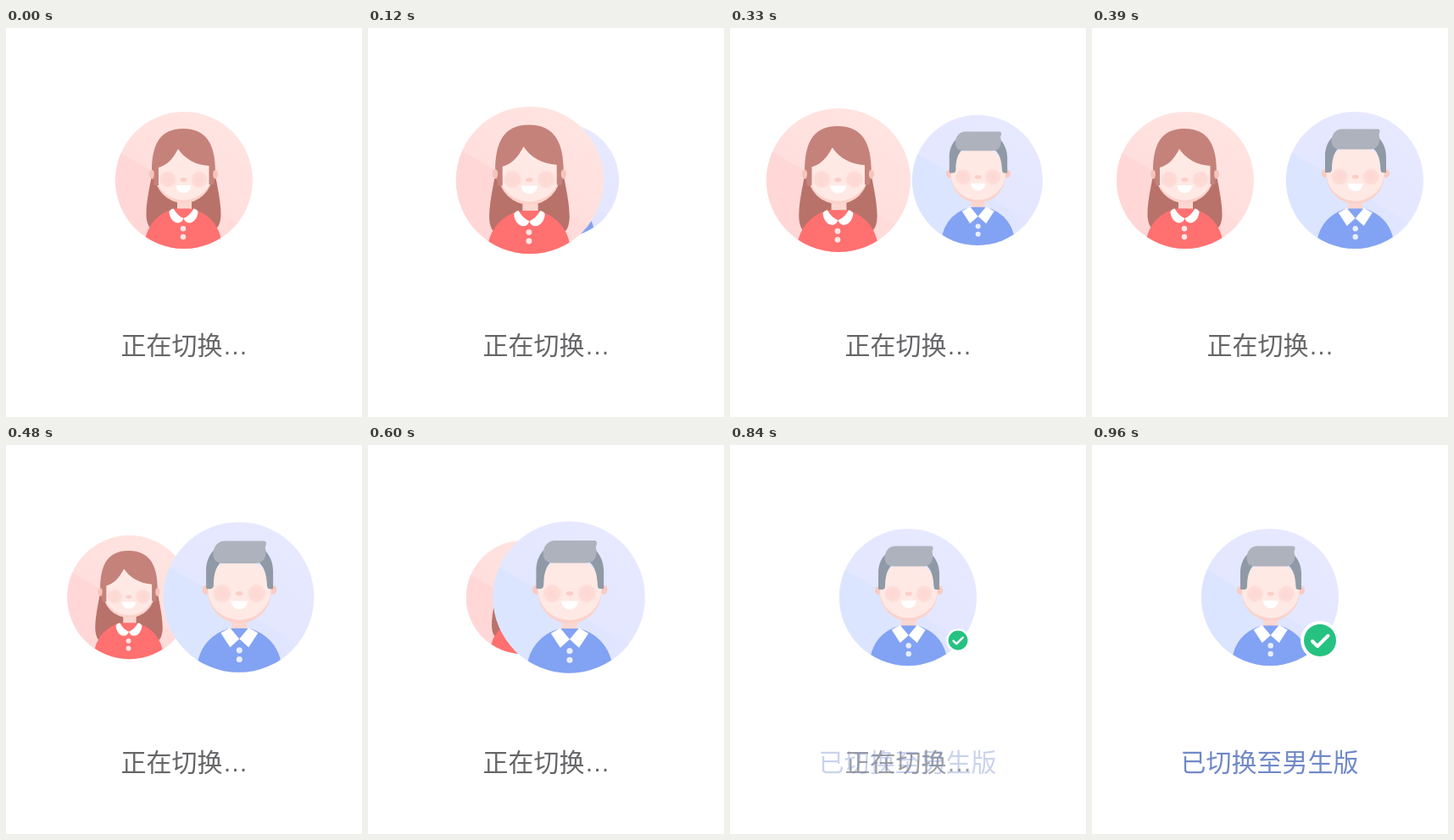
Animation of 420 by 460 pixels, one loop 990 ms. Source, as an HTML page with a canvas:

```html
<!DOCTYPE html>
<html lang="zh-CN">
<head>
<meta charset="utf-8">
<style>
  html, body { margin: 0; width: 100%; height: 100%; overflow: hidden; background: #fff; }
  canvas { display: block; }
</style>
</head>
<body>
<canvas id="stage" width="420" height="460"></canvas>
<script>
const ctx = document.getElementById('stage').getContext('2d');
const LOOP = 990, TURN = 390, SETTLE = 770, DONE = 960;
const RADIUS = 81, REACH = 100, CENTER = { x: 210, y: 180 };
const CJK = '30px "Noto Sans CJK SC", "Noto Sans CJK", sans-serif';
const LATIN = '30px "Liberation Sans", Arial, sans-serif';

const clamp01 = v => Math.min(1, Math.max(0, v));

function fillPath(color, d) {
  ctx.fillStyle = color;
  ctx.fill(new Path2D(d));
}

function ellipse(color, x, y, rx, ry = rx) {
  ctx.fillStyle = color;
  ctx.beginPath();
  ctx.ellipse(x, y, rx, ry, 0, 0, Math.PI * 2);
  ctx.fill();
}

function mirrored(draw, axis = 0) {
  for (const side of [1, -1]) {
    ctx.save();
    ctx.translate(axis, 0);
    ctx.scale(side, 1);
    draw();
    ctx.restore();
  }
}

function cheek(x, y) {
  const glow = ctx.createRadialGradient(x, y, 0, x, y, 11.5);
  glow.addColorStop(0, '#fdd8d3');
  glow.addColorStop(0.7, '#fddbd6');
  glow.addColorStop(1, 'rgba(255,230,225,0)');
  ellipse(glow, x, y, 11.5);
}

function backdrop(dark, mid, light) {
  const tone = ctx.createLinearGradient(-45, 70, 45, -70);
  tone.addColorStop(0, mid);
  tone.addColorStop(1, light);
  ctx.fillStyle = tone;
  ctx.fillRect(-82, -82, 164, 164);
  const shade = ctx.createLinearGradient(-40, 0, 50, 0);
  shade.addColorStop(0, dark);
  shade.addColorStop(1, mid);
  fillPath(shade, 'M-82 -37 L82 61 V82 H-82 Z');
}

function body(color, button, x) {
  fillPath('#fad7d0', 'M-8 20 H9 V37 H-8 Z');
  ctx.save();
  ctx.beginPath();
  ctx.rect(-60, 33.5, 120, 60);
  ctx.clip();
  ellipse(color, x, 78, 45.5);
  ctx.restore();
  ellipse(button, x, 57.3, 3.2);
  ellipse(button, x, 67, 3.2);
}

function face(x, chin, cheekY, noseY, mouthY) {
  const y = chin - 34;
  ellipse('#fbd2ca', x, y, 34);
  ellipse('#ffe9e5', x, y - 2.5, 34, 33);
  cheek(x - 18.5, cheekY);
  cheek(x + 18.5, cheekY);
  ellipse('#fbcec7', x, noseY, 4, 2.4);
  fillPath('#fff', `M${x - 9} ${mouthY} H${x + 9} C${x + 8} ${mouthY + 12} ${x - 8} ${mouthY + 12} ${x - 9} ${mouthY} Z`);
}

function girl() {
  backdrop('#ffd7d7', '#ffdbda', '#ffe4e1');
  mirrored(() => fillPath('#b8726a',
    'M0 -20 H35 C38 0 44 22 44 40 C44 50 41 58 35 58 H0 Z'), -0.5);
  body('#ff7070', '#ffe6e3', -1);
  mirrored(() => fillPath('#fff',
    'M12 33.5 C14 34 16 35 17 37 C17 44 12 51 6 50.5 C3 50 1 48 0 45 C5 43 9 39 12 33.5 Z'), -0.5);
  mirrored(() => ellipse('#f5c4bb', 36.5, -7, 4, 5.5), -0.5);
  face(-0.5, 27, -1, -0.5, 6);
  fillPath('#c5827a', 'M-38 -10 C-38 -40 -30 -61 -1 -61 C28 -61 37 -40 37 -10 ' +
    'L35 5 H29.5 V-17 C14 -18 1 -25 -7 -37 C-13 -25 -20 -18 -30 -15 V6 H-35 Z');
  mirrored(() => ellipse('#f5c4bb', 37.2, -7, 2.5, 5), -0.5);
}

function boy() {
  backdrop('#dbe5ff', '#e1e5ff', '#e6e9ff');
  body('#82a2f3', '#e8eeff', 0.7);
  mirrored(() => fillPath('#fff', 'M10 33 L20 38.5 L10 54 L0 45 Z'), 0.7);
  mirrored(() => ellipse('#fbcac1', 36, -8, 4, 5), 1);
  face(0.7, 28, -4, -4, 4);
  fillPath('#8f9aa6', 'M-35 -10 V-28 C-35 -46 -24 -58 -8 -58 H10 C26 -58 37 -44 37 -28 V-9 ' +
    'H33 Q31 -9 30.5 -12 C30 -26 27 -34 20 -39 H-18 C-24 -34 -27 -26 -27 -13 Q-27 -9 -31 -9 H-34 Z');
  fillPath('#adb2bd', 'M-15 -60.5 H27 Q30 -60.5 29.5 -57 L28.5 -54 C31 -44 27 -36.5 18 -36.5 ' +
    'H-17 C-24 -36.5 -27.5 -41 -27.5 -46 C-27.5 -55 -22 -60.5 -15 -60.5 Z');
}

function avatar(draw, x, radius) {
  ctx.save();
  ctx.translate(x, CENTER.y);
  ctx.scale(radius / RADIUS, radius / RADIUS);
  ctx.beginPath();
  ctx.arc(0, 0, RADIUS, 0, Math.PI * 2);
  ctx.clip();
  draw();
  ctx.restore();
}

// Both avatars swing out by the same distance, then swap depth and close again.
function spread(t) {
  if (t < TURN) {
    const ramp = 113;
    const run = s => s < ramp ? s * s / (2 * ramp) : s - ramp / 2;
    return REACH * run(t) / run(TURN);
  }
  return REACH * Math.pow(clamp01((SETTLE - t) / (SETTLE - TURN)), 1.62);
}

function avatars(t) {
  const d = spread(t);
  const depth = 0.222 * (REACH - d);
  const near = RADIUS + Math.min(depth, 0.32 * d, 12.6);
  const far = RADIUS - Math.min(depth, 14);
  const girlInFront = t < TURN;
  const paintGirl = () => avatar(girl, CENTER.x - d, girlInFront ? near : far);
  const paintBoy = () => avatar(boy, CENTER.x + d, girlInFront ? far : near);
  const order = girlInFront ? [paintBoy, paintGirl] : [paintGirl, paintBoy];
  if (t >= SETTLE || t === 0) order.shift();
  order.forEach(paint => paint());
}

function badge(size) {
  if (size <= 0) return;
  ctx.save();
  ctx.translate(269, 231);
  ctx.scale(size, size);
  ellipse('#fff', 0, 0, 23);
  ellipse('#26c281', 0, 0, 19);
  ctx.strokeStyle = '#fff';
  ctx.lineWidth = 4;
  ctx.lineCap = ctx.lineJoin = 'round';
  ctx.stroke(new Path2D('M-9 1 L-3 7 L9.5 -5.5'));
  ctx.restore();
}

function write(text, x, font, color, alpha) {
  ctx.globalAlpha = alpha;
  ctx.font = font;
  ctx.fillStyle = color;
  ctx.fillText(text, x, 386.4);
  ctx.globalAlpha = 1;
}

function render(t) {
  ctx.fillStyle = '#fff';
  ctx.fillRect(0, 0, 420, 460);
  avatars(t);
  const done = clamp01((t - SETTLE) / (DONE - SETTLE));
  badge(1 - (1 - done) ** 2);
  if (done < 1) {
    write('正在切换', 135.5, CJK, '#666669', 1 - done);
    write('…', 255.5, LATIN, '#666669', 1 - done);
  }
  if (done > 0) write('已切换至男生版', 104.4, CJK, '#7088c8', done);
}

const start = performance.now();
function tick() {
  const t = (performance.now() - start) % LOOP;
  render(Math.floor(t / 30) * 30);
  requestAnimationFrame(tick);
}
tick();
</script>
</body>
</html>
```
